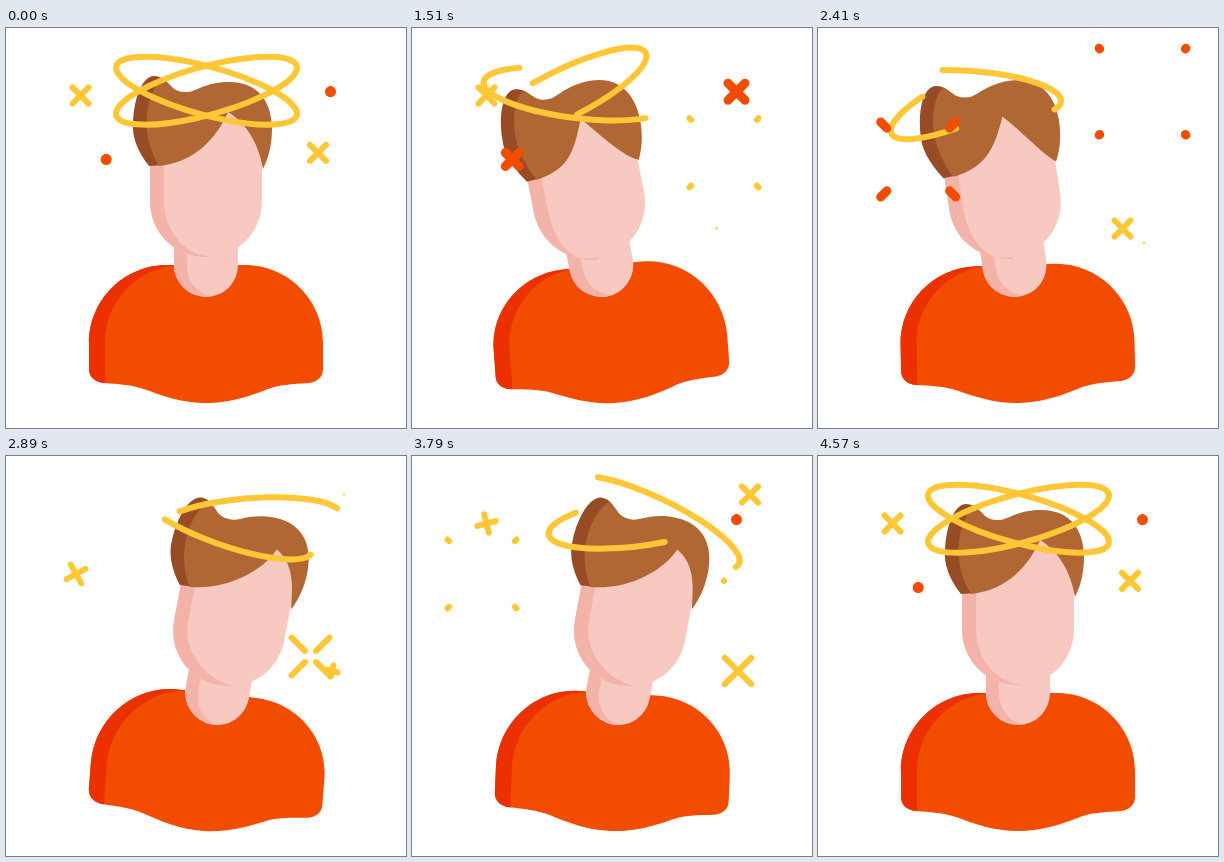
Animation, 400 px wide and 400 px high, one loop 5.47 s. Source, as an HTML page:

```html
<!DOCTYPE html>
<html lang="en">
<head>
<meta charset="utf-8">
<title>Dizzy</title>
<style>
html, body { margin: 0; width: 100%; height: 100%; overflow: hidden; background: #fff; }
svg { display: block; width: 100vw; height: 100vh; }
.line { fill: none; stroke-linecap: round; }
</style>
</head>
<body>
<svg viewBox="0 0 400 400">
  <path id="body" fill="#f24c00"/>
  <path id="bodyShade" fill="#ec3000"/>
  <g id="head">
    <path fill="#f8c9c0" d="M168 205V237A32 32 0 0 0 232 237V205Z"/>
    <path fill="#f4b3a9" d="M168 210V237C168 256 184 270 207 268C192 267 181 254 181 237V222Z"/>
    <path fill="#f8c9c0" d="M144 80V173C144 204 168 229 200 229C232 229 256 204 256 173V80Z"/>
    <path id="faceShade" fill="#f4b3a9"/>
    <path id="hairShade" fill="#984c25"/>
    <path id="hair" fill="#b06734"/>
  </g>
  <g id="rings" class="line" stroke="#ffc636" stroke-width="6"></g>
  <g id="sparks" class="line"></g>
</svg>
<script>
const LOOP = 5470, BEGIN = 1000, END = 4570;
const OPEN = 300, BURST = 540, RETURN = 400;
const YELLOW = '#ffc636', RED = '#f24c00';

const $ = id => document.getElementById(id);
const rad = deg => deg * Math.PI / 180;
const clamp = v => Math.max(0, Math.min(1, v));
const sine = p => (1 - Math.cos(Math.PI * p)) / 2;
const span = (t, a, b) => clamp((t - a) / (b - a));
const ease = (t, a, b) => sine(span(t, a, b));
const draw = (el, d) => el.setAttribute('d', d);

function addPath(parent) {
  const el = document.createElementNS('http://www.w3.org/2000/svg', 'path');
  return $(parent).appendChild(el);
}

// Lean left, swing over to the right, come back to rest
const swing = (t, size, left, right, back) => size * (
  -ease(t, BEGIN, BEGIN + left) + 2 * ease(t, right, right + 700) - ease(t, back, END));

const TORSO = 'M161 237 L239 237 C282 237 317 272 317 315 L317 341 C317 349 311 354 303 355 ' +
  'C286 356 272 357 262 361 C242 369 222 375 200 375 C176 375 157 368 138 361 ' +
  'C126 357 112 356 98 355 C89 354 83 349 83 341 L83 315 C83 272 118 237 161 237Z';
const TORSO_SHADE = 'M177 237 C134 237 99 272 99 315 L99 355 L98 355 ' +
  'C89 354 83 349 83 341 L83 315 C83 272 118 237 161 237Z';

// Turns each point of a path; the top leans more than the bottom
function lean(d, deg) {
  return d.replace(/([\d.]+) ([\d.]+)/g, (m, px, py) => {
    const x = px - 200, y = py - 335;
    const a = rad(deg * (0.85 - 0.004 * y));
    const c = Math.cos(a), s = Math.sin(a);
    return (200 + x * c - y * s).toFixed(2) + ' ' + (335 + x * s + y * c).toFixed(2);
  });
}

function drawBody(t) {
  const tilt = swing(t, 4.9, 600, 2130, 3100);
  draw($('body'), lean(TORSO, tilt));
  draw($('bodyShade'), lean(TORSO_SHADE, tilt));
  return tilt;
}

function drawHead(t, tilt) {
  const turn = swing(t, 11.3, 560, 2260, 3650);
  $('head').setAttribute('transform', `translate(${2.3 * tilt} 0) rotate(${turn} 200 237)`);

  const tipX = 208 + 0.95 * turn, tipY = 229 - 0.18 * turn;
  draw($('faceShade'), 'M144 80V173C144 204 168 229 200 229' +
    `L${tipX} ${tipY}C${tipX - 28} 229 158 204 158 173V80Z`);

  // The parting slides across the forehead as the head turns
  const l = Math.max(0, -turn) / 11, r = Math.max(0, turn) / 11;
  const px = 222 - 14 * l + 10 * r, py = 84 + 5.5 * l + r;
  const low = 138 + 3 * l;
  draw($('hairShade'), `M143 ${low}C130 122 126 106 127 96C128 66 138 48 148 48` +
    `C156 48 160 53 166 59L172 100L158 ${low - 1}Z`);
  draw($('hair'), 'M156 51C164 56 168 64 179 64C189 65 198 54 223 54C254 54 266 76 266 101' +
    `C266 118 262 131 257 141C${254 - 11 * l} ${122 + 13 * l} ` +
    `${px + 22 - 4 * l} ${py + 13 + 9 * l} ${px} ${py}` +
    `C${px - 11} ${py + 25} 190 ${low - 4} 153 ${low}C142 120 139 100 141 85C143 70 149 56 156 51Z`);
}

// Two rings that lag the head; each opens with a kick, spins, and closes again
const rings = [
  { tilt: 15.3, start: 121, kick: 158, left: 800, right: 2450, back: 3650 },
  { tilt: -15.3, start: 10, kick: 126, left: 540, right: 2280, back: 3250 }
];

function drawRing(ring, t) {
  const a = 93.6, b = 24.2;
  const turn = swing(t, 11.4, ring.left, ring.right, ring.back);
  const angle = ring.tilt + turn, c = Math.cos(rad(angle)), s = Math.sin(rad(angle));
  const cx = 200.5 + 4.2 * turn - 0.25 * Math.abs(turn);
  const cy = 62.7 + 0.37 * Math.abs(turn);
  const point = u => {
    const x = a * Math.cos(rad(u)), y = b * Math.sin(rad(u));
    return `${(cx + x * c - y * s).toFixed(2)} ${(cy + x * s + y * c).toFixed(2)}`;
  };
  const kick = span(t, BEGIN, 1510);
  const from = ring.start + ring.kick * kick + 0.237 * Math.max(0, t - BEGIN);
  const length = 360 - 170 * kick - 70 * ease(t, 1510, 2650) + 240 * ease(t, 3560, END);
  let d = 'M' + point(from);
  for (let i = 1; i <= 4; i++) d += `A${a} ${b} ${angle} 0 1 ${point(from + length * i / 4)}`;
  draw(ring.el, d);
}

const sparks = [];

function addSpark(spark) {
  spark.el = addPath('sparks');
  spark.el.setAttribute('stroke', spark.color);
  sparks.push(spark);
}

const addCross = (x, y, birth, burst, grow = 800) =>
  addSpark({ x, y, birth, burst, grow, color: YELLOW, arm: 8, reach: 36, width: 6, draw: drawCross });
const addDot = (x, y, open, burst, back) =>
  addSpark({ x, y, open, burst, back, color: RED, arm: 8.5, reach: 44, width: 9, draw: drawDot });

function strokes(k, inner, outer, width, turn = 0) {
  let d = '';
  for (const sx of [-1, 1]) {
    for (const sy of [-1, 1]) d += `M${sx * inner} ${sy * inner}L${sx * outer} ${sy * outer}`;
  }
  draw(k.el, d);
  k.el.setAttribute('stroke-width', width);
  k.el.setAttribute('transform', `translate(${k.x} ${k.y}) rotate(${turn})`);
}

function drawBurst(k, t) {
  const p = (t - k.burst) / BURST;
  if (p >= 1) return draw(k.el, '');
  const outer = k.arm + (k.reach - k.arm) * p;
  const inner = k.reach * Math.pow(clamp((p - 0.2) / 0.8), 1.3);
  strokes(k, Math.min(inner, outer - 0.1), outer, k.width);
}

function drawCross(k, t) {
  if (t < k.birth) return draw(k.el, '');
  if (t >= k.burst) return drawBurst(k, t);
  const g = span(t, k.birth, k.birth + k.grow);
  const h = ease(g, 0.25, 1);
  strokes(k, 0, k.arm * h + 0.01, k.width * clamp(0.25 + g * 3.5), 90 * Math.pow(1 - h, 0.6));
}

function drawDot(k, t) {
  if (t >= k.back) return strokes(k, 0, 0.01, 11 * ease(t, k.back, k.back + RETURN));
  if (t >= k.burst) return drawBurst(k, t);
  const p = ease(t, k.open, k.open + OPEN);
  strokes(k, 0, 0.01 + k.arm * p, 11 - 2 * p);
}

for (const ring of rings) ring.el = addPath('rings');

addCross(74.5, 67.5, -LOOP, 1620);
addCross(312, 124.8, -LOOP, BEGIN);
addCross(304.5, 200.5, 1480, 2680);
addCross(70, 118, 2412, 3280, 540);
addCross(326, 215, 2390, 3690);
addCross(338, 38.5, 2870, 4020);
addCross(74.5, 67.5, 3150, LOOP);
addCross(312, 124.8, 3580, LOOP);
addDot(324.5, 63.7, 1200, 1880, 3400);
addDot(100.2, 131.5, 1300, 1970, 3900);

function render(t) {
  drawHead(t, drawBody(t));
  rings.forEach(ring => drawRing(ring, t));
  sparks.forEach(k => k.draw(k, t));
}

const origin = performance.now();
function tick() {
  render((performance.now() - origin) % LOOP);
  requestAnimationFrame(tick);
}
tick();
</script>
</body>
</html>
```
